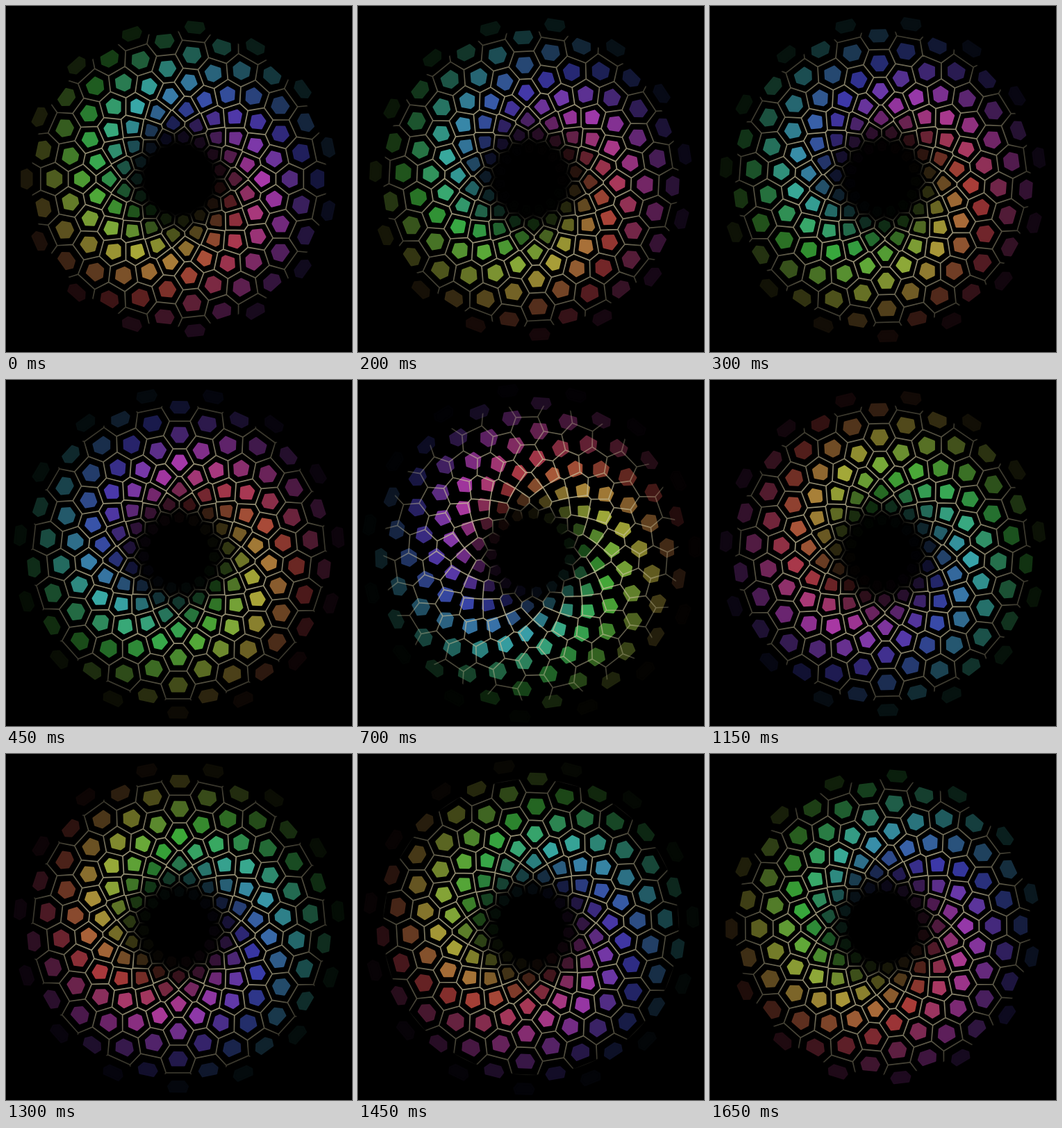
Write an HTML page with a canvas that moves like this. It is 498 px wide and 498 px high and loops after 1700 ms.

```html
<!DOCTYPE html>
<html>
<head>
<meta charset="utf-8">
<style>
  html, body { margin: 0; height: 100%; overflow: hidden; background: #000; }
  canvas { display: block; }
</style>
</head>
<body>
<canvas id="stage" width="498" height="498"></canvas>
<script>
const ctx = document.getElementById('stage').getContext('2d');
const SIZE = 498, CENTER = SIZE / 2, GAP = SIZE / 25, SPOKES = 15, RINGS = 12;
const LOOP = 1700, STEP = 50;
const HALF = Math.PI / SPOKES; // half the angle between neighbours in a ring
const NET_EDGE = 214;

const ramp = (v, from, to) => Math.min(1, Math.max(0, (v - from) / (to - from)));
const smooth = x => x * x * (3 - 2 * x);

// Brightness by radius: dark at the hole, fading at the rim
const tileGlow = r => smooth(ramp(r, 40, 120)) * ramp(r, 238, 130);
const netGlow = r => .75 * ramp(r, 50, 85) * (1 - .65 * ramp(r, 130, NET_EDGE));

const netColor = ctx.createRadialGradient(CENTER, CENTER, 0, CENTER, CENTER, NET_EDGE);
for (let r = 0; r < NET_EDGE; r += 4)
  netColor.addColorStop(r / NET_EDGE, `rgba(198,190,152,${netGlow(r)})`);
netColor.addColorStop(1, 'transparent');

const distance2 = (p, q) => (p[0] - q[0]) ** 2 + (p[1] - q[1]) ** 2;

// Keep the part of a polygon that is nearer to c than to q
function clip(poly, c, q) {
  const side = p => distance2(p, q) - distance2(p, c);
  const out = [];
  poly.forEach((a, i) => {
    const b = poly[(i + 1) % poly.length], sa = side(a), sb = side(b);
    if (sa >= 0) out.push(a);
    if (sa * sb < 0) {
      const k = sa / (sa - sb);
      out.push([a[0] + (b[0] - a[0]) * k, a[1] + (b[1] - a[1]) * k]);
    }
  });
  return out;
}

// Voronoi cell of a seed at (r, 0), cut by its eight neighbours
function cell(r) {
  let poly = [[r - 60, -60], [r + 60, -60], [r + 60, 60], [r - 60, 60]];
  for (let ring = -2; ring <= 2; ring++)
    for (let turn = -2; turn <= 2; turn++) {
      const d = r + ring * GAP, a = turn * HALF;
      if (Math.abs(ring) + Math.abs(turn) === 2 && d > 0)
        poly = clip(poly, [r, 0], [d * Math.cos(a), d * Math.sin(a)]);
    }
  return poly;
}

function trace(poly, angle) {
  const c = Math.cos(angle), s = Math.sin(angle);
  poly.forEach(([x, y], i) =>
    ctx[i ? 'lineTo' : 'moveTo'](CENTER + x * c - y * s, CENTER - x * s - y * c));
  ctx.closePath();
}

function drawTile(tile, r, angle, t) {
  const hue = 300 + (120 - r) * .78 - angle * 180 / Math.PI + 360 * t;
  ctx.fillStyle = ctx.strokeStyle = `hsl(${hue},50%,${44 * tileGlow(r)}%)`;
  ctx.lineWidth = 3; // rounds the corners
  ctx.beginPath();
  trace(tile, angle);
  ctx.fill();
  ctx.stroke();
}

function draw(time) {
  const t = Math.floor(time % LOOP / STEP) * STEP / LOOP;
  const drift = t * 2 % 1;                        // one ring outwards, half a cell clockwise
  const slip = ramp(t, 1 / 3, 2 / 3) * 2 * HALF;  // the net turns by a cell in the middle third
  const net = new Path2D();

  ctx.fillStyle = '#000';
  ctx.fillRect(0, 0, SIZE, SIZE);
  ctx.lineJoin = 'round';

  const rings = [];
  for (let n = 2; n <= RINGS; n++) {
    const r = (n + drift) * GAP, poly = cell(r);
    const angles = Array.from({ length: SPOKES }, (_, k) => (n % 2 - drift + 2 * k) * HALF);
    const flat = .5 - .14 * ramp(r, 180, 215);
    const tile = poly.map(([x, y]) => [r + (x - r) * flat, y * .5]);
    for (const angle of angles) drawTile(tile, r, angle, t);
    rings.push({ poly, angles });
  }

  ctx.beginPath();
  for (const { poly, angles } of rings)
    for (const angle of angles) trace(poly, angle + slip);
  ctx.strokeStyle = netColor;
  ctx.lineWidth = 1.7;
  ctx.stroke();
}

function frame() {
  draw(performance.now());
  requestAnimationFrame(frame);
}
frame();
</script>
</body>
</html>
```
